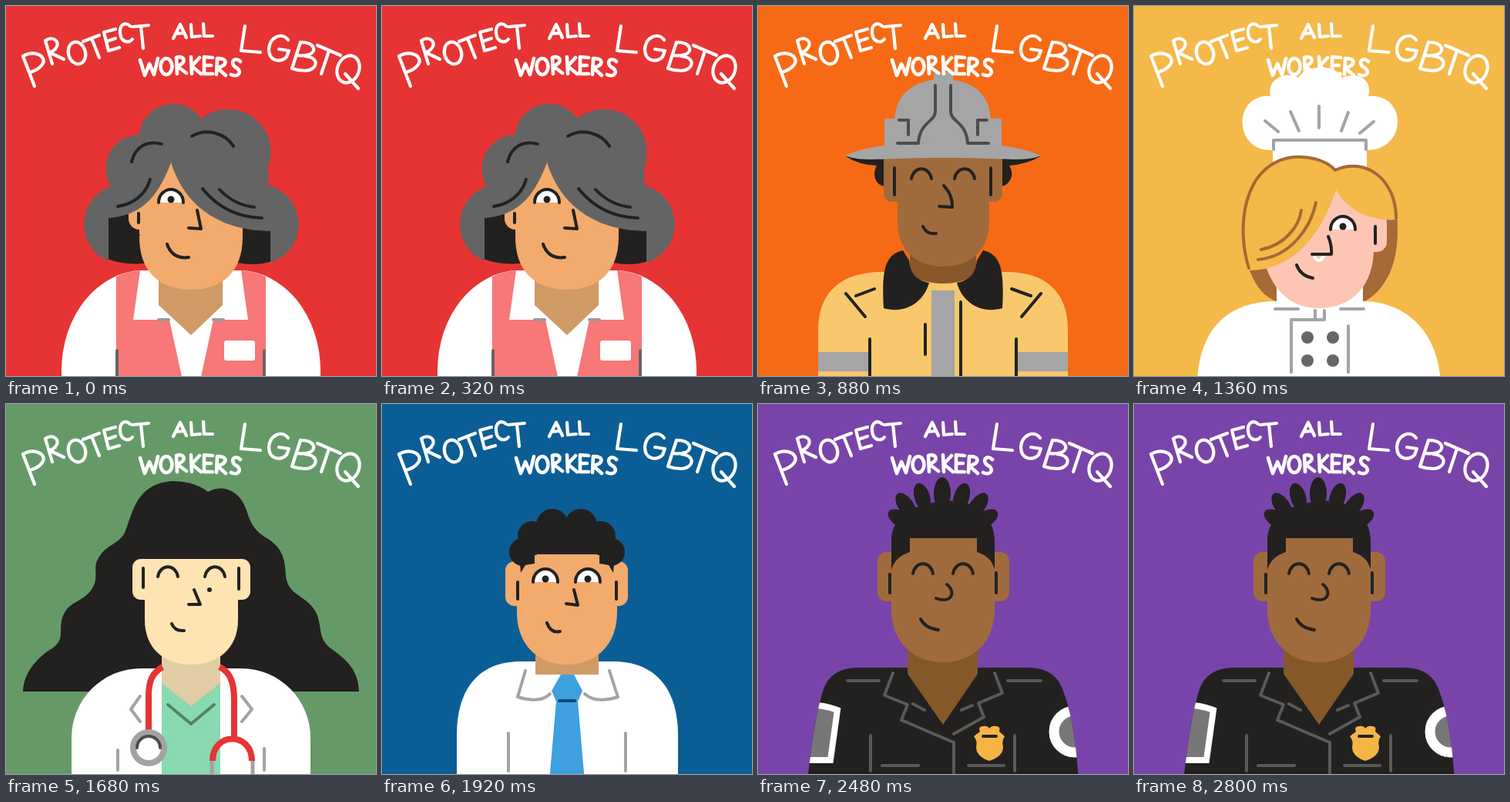
An HTML page that plays this animation: 480x480 px, repeating every 2880 ms.

```html
<!DOCTYPE html>
<html lang="en">
<head>
<meta charset="utf-8">
<title>Protect all LGBTQ workers</title>
<style>
html, body { margin: 0; width: 100%; height: 100%; overflow: hidden; background: #e63434; }
svg { display: block; width: 100vw; height: 100vh; }

.worker { visibility: hidden; animation: show 2880ms step-end infinite; animation-delay: calc(var(--i) * 480ms - 2880ms); }
@keyframes show {
  0% { visibility: visible; }
  16.66667%, 100% { visibility: hidden; }
}

/* hand-drawn edges, redrawn every 80 ms */
#art { animation: boil 240ms step-end infinite; }
@keyframes boil {
  0% { filter: url(#rough0); }
  33.33333% { filter: url(#rough1); }
  66.66667%, 100% { filter: url(#rough2); }
}

.l { fill: none; stroke: #222; stroke-width: 4; stroke-linecap: round; stroke-linejoin: round; }
.g { stroke: #a3a3a3; }
.d { stroke: #595959; }
.w { fill: #fff; }
.k { fill: #222120; }
.brown { fill: #a06b3c; }
.tan { fill: #f3aa6d; }
#text { fill: none; stroke: #fff; stroke-width: 4.2; stroke-linecap: round; stroke-linejoin: round; }
</style>
</head>
<body>
<svg viewBox="0 0 480 480" role="img" aria-label="Protect all LGBTQ workers">
<defs>
  <filter id="rough0" filterUnits="userSpaceOnUse" x="-20" y="-20" width="520" height="520" color-interpolation-filters="sRGB">
    <feTurbulence type="fractalNoise" baseFrequency=".25" seed="2"/>
    <feDisplacementMap in="SourceGraphic" scale="1.5" xChannelSelector="R" yChannelSelector="G"/>
  </filter>
  <filter id="rough1" filterUnits="userSpaceOnUse" x="-20" y="-20" width="520" height="520" color-interpolation-filters="sRGB">
    <feTurbulence type="fractalNoise" baseFrequency=".25" seed="5"/>
    <feDisplacementMap in="SourceGraphic" scale="1.5" xChannelSelector="R" yChannelSelector="G"/>
  </filter>
  <filter id="rough2" filterUnits="userSpaceOnUse" x="-20" y="-20" width="520" height="520" color-interpolation-filters="sRGB">
    <feTurbulence type="fractalNoise" baseFrequency=".25" seed="9"/>
    <feDisplacementMap in="SourceGraphic" scale="1.5" xChannelSelector="R" yChannelSelector="G"/>
  </filter>
  <g id="eye">
    <path class="w" d="M-16 0A16 17 0 0 1 16 0Z"/>
    <path class="l" d="M-16 0A16 17 0 0 1 16 0"/>
    <circle class="k" cy="-4" r="4.5"/>
  </g>
  <path id="wink" class="l" d="M-13 0C-10 -17 10 -17 13 0"/>
  <path id="uniform" d="M64 490C70 440 75 400 85 370Q95 342 130 342H350Q385 342 395 370C407 400 413 440 416 490Z"/>
  <clipPath id="sleeves"><use href="#uniform"/></clipPath>
</defs>

<g id="art">
  <!-- shop assistant -->
  <g class="worker" style="--i:0">
    <path fill="#e63434" d="M-20-20H500V500H-20Z"/>
    <path class="k" d="M132 240H180V334Q150 336 132 328ZM300 240H345V331Q325 338 300 333Z"/>
    <path class="w" d="M72 490V473A106 130 0 0 1 178 343H302A106 130 0 0 1 408 473V490Z"/>
    <path fill="#f87777" d="M143 351Q158 344 175 343H305Q322 344 337 351V490H143Z"/>
    <path class="w" d="M174 343H305L314 407H269L251 490H230L212 407H165Z"/>
    <path fill="#d09a66" d="M198 340H281V388L240 427L198 388Z"/>
    <rect class="tan" x="159" y="252" width="30" height="38" rx="14"/>
    <path class="tan" d="M173 200V300C173 345 200 368 240 368S307 345 307 300V200Z"/>
    <path fill="#646464" d="M133 331A52 52 0 0 1 136 234A44 44 0 0 1 173 167A44 44 0 0 1 253 146A56 56 0 0 1 340 210L341 233A52 52 0 0 1 343 333V292C290 292 235 270 214 203C195 255 170 272 133 275Z"/>
    <path class="l" d="M163 202C168 181 185 174 202 179M241 169C260 158 285 165 295 182M145 260C165 257 181 245 187 225M255 237C275 262 300 274 332 275M277 238C290 252 305 259 322 261M172 269V281"/>
    <use href="#eye" x="214" y="255"/>
    <path class="l" d="M248 265L253 289L237 288M209 309Q216 329 237 326"/>
    <path class="l" style="stroke:#999" d="M198 407H211M269 407H282"/>
    <path class="l" style="stroke:#666" d="M144 447V490M335 447V490"/>
    <rect class="w" x="283" y="434" width="40" height="26" rx="3"/>
  </g>

  <!-- firefighter -->
  <g class="worker" style="--i:1">
    <path fill="#f66a16" d="M-20-20H500V500H-20Z"/>
    <path class="k" d="M114 195H366Q350 205 326 207Q334 220 323 231Q316 236 308 233V200H172V233Q160 236 154 228Q148 218 154 207Q130 206 114 195Z"/>
    <path fill="#f9c86d" d="M78 490V420C78 370 110 345 160 345H322C372 345 402 370 402 420V490Z"/>
    <path fill="#a5a5a5" d="M225 369H255V490H225ZM78 449H145V474H78ZM335 449H402V474H335Z"/>
    <path fill="#895629" d="M197 310H283V350Q240 370 197 350Z"/>
    <path class="k" d="M188 317C166 322 160 340 163 392C190 400 215 385 222 359C208 356 198 350 196 330ZM292 317C314 322 320 340 317 392C290 400 265 385 258 359C272 356 282 350 284 330Z"/>
    <g class="brown">
      <rect x="163" y="190" width="30" height="64" rx="11"/>
      <rect x="287" y="190" width="30" height="64" rx="11"/>
      <path d="M181 190V280C181 318 206 338 240 338S300 318 300 280V190Z"/>
    </g>
    <g fill="#a5a5a5">
      <rect x="228" y="86" width="25" height="30" rx="4"/>
      <path d="M177 150C178 112 205 95 240 95S302 112 302 150V186H177Z"/>
      <rect x="164" y="146" width="24" height="40" rx="2"/>
      <rect x="292" y="146" width="24" height="40" rx="2"/>
      <path d="M113 194C145 180 185 178 240 178S335 180 367 194C345 203 320 197 240 197S135 203 113 194Z"/>
    </g>
    <path class="l" style="stroke:#4c4c4c" d="M230 103V137C230 150 210 150 208 178H181M250 103V137C250 150 270 150 272 178H299M183 148H195V167M297 148H285V167"/>
    <path class="l" d="M177 210V245M302 210V245M241 233Q253 246 252 261L235 260M214 286Q219 297 231 295"/>
    <use href="#wink" x="212" y="224"/>
    <use href="#wink" x="268" y="224"/>
    <path class="l" d="M114 373L139 403M127 376L151 367M367 373L342 403M354 376L329 367M217 413V452M263 384V490M145 432V490M335 432V490"/>
  </g>

  <!-- chef -->
  <g class="worker" style="--i:2">
    <path fill="#f5b949" d="M-20-20H500V500H-20Z"/>
    <path class="w" d="M180 215V187C128 190 128 113 177 117C172 92 200 85 213 93C225 75 262 75 270 93C290 85 310 95 304 117C355 113 355 187 302 187V220Z"/>
    <path class="l g" d="M170 149L187 163M203 137L214 162M240 130V158M278 138L269 162M311 150L293 165M181 186V174H301V186"/>
    <path fill="#a56a35" d="M150 343Q162 376 187 384V335ZM300 270H341C346 325 332 367 296 385Z"/>
    <path class="w" d="M82 490C85 410 130 383 185 383V350H297V383C350 383 395 420 398 490Z"/>
    <g fill="#fdc6b4">
      <rect x="296" y="268" width="32" height="51" rx="13"/>
      <path d="M170 335C183 375 208 392 240 392C285 392 311 360 311 315V225H230Z"/>
    </g>
    <path fill="#f5b949" d="M150 343C133 290 140 210 200 197C225 193 250 200 261 213C300 195 340 225 340 277C310 280 276 266 262 238C245 292 210 342 150 343Z"/>
    <path class="l" style="stroke:#a56a35" d="M149 340C133 290 140 210 200 197C225 193 250 200 261 213C300 195 340 225 340 275M165 316C195 310 214 287 217 265M161 329C205 325 230 285 236 255"/>
    <use href="#eye" x="271" y="290"/>
    <path class="l" style="stroke:#fff" d="M234 325Q239 335 246 325"/>
    <path class="l" d="M252 299Q257 311 256 322H231M211 336Q216 350 232 353M313 286V308"/>
    <path class="l g" d="M183 393H213M268 393H298M204 475V407H247V395M235 395V406M278 415V475"/>
    <g fill="#666">
      <circle cx="225" cy="430" r="8"/><circle cx="258" cy="430" r="8"/>
      <circle cx="225" cy="460" r="8"/><circle cx="258" cy="460" r="8"/>
    </g>
  </g>

  <!-- doctor -->
  <g class="worker" style="--i:3">
    <path fill="#659a68" d="M-20-20H500V500H-20Z"/>
    <path class="k" d="M22 373C23 345 45 326 60 317C80 303 64 290 77 269C86 255 105 254 113 237C121 222 111 213 121 198C131 182 146 182 154 167C164 146 166 104 215 100C240 100 255 108 262 114C282 103 304 113 312 138C318 157 324 166 340 175C358 187 362 200 363 222C365 250 391 247 403 272C411 293 404 305 424 319C442 332 457 345 458 373Z"/>
    <path class="w" d="M85 490V433A90 90 0 0 1 175 343H305A90 90 0 0 1 395 433V490Z"/>
    <path fill="#89d9b1" d="M202 350H278V490H202Z"/>
    <path fill="#e1cca3" d="M202 310H278V362L240 392L202 362Z"/>
    <g fill="#fee3b3">
      <rect x="164" y="201" width="153" height="53" rx="11"/>
      <path d="M180 230V280C180 318 206 338 240 338S301 318 301 280V230Z"/>
    </g>
    <path class="l" d="M178 213V238M302 213V240M244 241L252 260H237M215 285Q219 295 231 294"/>
    <use href="#wink" x="210" y="224"/>
    <use href="#wink" x="271" y="224"/>
    <circle class="k" cx="264" cy="241" r="3"/>
    <path class="l" style="stroke:#548658" d="M210 390L240 415L270 390"/>
    <path class="l g" d="M174 379L162 396L174 412M306 379L319 396L306 412M145 449V475M335 447V475"/>
    <path class="l g" style="stroke-width:5" d="M267 460V490M320 460V490"/>
    <path class="l" style="stroke:#e63434;stroke-width:8;stroke-linecap:butt" d="M203 341C190 349 185 358 185 380V425M277 341C293 349 296 365 296 385V433M268 463C268 425 319 425 319 463"/>
    <circle class="w" cx="185" cy="446" r="20" stroke="#a3a3a3" stroke-width="8"/>
    <path class="l" style="stroke:#4c4c4c" d="M170 446A15 15 0 0 1 200 446"/>
  </g>

  <!-- office worker -->
  <g class="worker" style="--i:4">
    <path fill="#0b5e95" d="M-20-20H500V500H-20Z"/>
    <path class="w" d="M97 490V430C97 370 125 334 180 334H300C355 334 384 370 384 430V490Z"/>
    <path fill="#d09a66" d="M199 310H281V351H199Z"/>
    <g class="tan">
      <rect x="160" y="204" width="30" height="58" rx="12"/>
      <rect x="289" y="204" width="30" height="58" rx="12"/>
      <path d="M175 190V270C175 314 204 338 240 338S305 314 305 270V190Z"/>
    </g>
    <g class="k">
      <circle cx="183" cy="192" r="18"/><circle cx="195" cy="171" r="19"/>
      <circle cx="221" cy="157" r="21"/><circle cx="258" cy="157" r="21"/>
      <circle cx="284" cy="171" r="19"/><circle cx="297" cy="192" r="18"/>
      <path d="M185 160H295V195H185Z"/>
    </g>
    <path class="tan" d="M198 196H282V218H198ZM186 208H200V225H180V219ZM294 208H280V225H300V219Z"/>
    <path class="k" d="M178 195H198V207L186 209L180 219ZM302 195H282V207L294 209L300 219Z"/>
    <use href="#eye" x="212" y="231"/>
    <use href="#eye" x="267" y="231"/>
    <path class="l" d="M176 231V253M304 231V253M249 241L254 261L239 259M214 284Q219 298 231 295"/>
    <path fill="#3ea0df" d="M232 351H249L260 372L254 386L263 490H217L226 386L220 372Z"/>
    <path class="l" style="stroke:#0b4775" d="M230 385H250"/>
    <path class="l g" d="M186 346L176 380Q205 389 218 376M295 346L306 380Q277 389 263 376M164 427V476M316 427V476"/>
  </g>

  <!-- officer -->
  <g class="worker" style="--i:5">
    <path fill="#7944a9" d="M-20-20H500V500H-20Z"/>
    <use class="k" href="#uniform"/>
    <g clip-path="url(#sleeves)">
      <path fill="#777" stroke="#fff" stroke-width="8" d="M60 390Q85 390 103 397L94 462H50Z"/>
      <circle cx="411" cy="425" r="27" fill="#777" stroke="#fff" stroke-width="13"/>
    </g>
    <path fill="#85582a" d="M194 310H285V350L240 416L194 350Z"/>
    <g class="brown">
      <rect x="155" y="192" width="32" height="64" rx="12"/>
      <rect x="294" y="192" width="32" height="64" rx="12"/>
      <path d="M174 210L190 170H290L306 210L307 265C307 310 278 335 240 335S173 310 173 265Z"/>
    </g>
    <g class="k">
      <path d="M173 215V175C175 145 200 130 240 126S305 145 307 175V215Q303 198 284 192V174H197V192Q178 198 173 215Z"/>
      <ellipse cx="239" cy="116" rx="11" ry="21"/>
      <ellipse cx="213" cy="121" rx="10" ry="19" transform="rotate(-17 213 121)"/>
      <ellipse cx="264" cy="121" rx="10" ry="19" transform="rotate(17 264 121)"/>
      <ellipse cx="192" cy="132" rx="10" ry="19" transform="rotate(-35 192 132)"/>
      <ellipse cx="285" cy="132" rx="10" ry="19" transform="rotate(35 285 132)"/>
      <ellipse cx="185" cy="149" rx="10" ry="18" transform="rotate(-60 185 149)"/>
      <ellipse cx="295" cy="149" rx="10" ry="18" transform="rotate(60 295 149)"/>
    </g>
    <use href="#wink" x="214" y="220"/>
    <use href="#wink" x="266" y="220"/>
    <path class="l" d="M171 221V245M309 219V245M245 234C257 243 252 260 231 252M211 279Q217 291 234 293"/>
    <path class="l d" d="M116 359H157M324 359H367M175 349L164 378L194 390L186 410L254 439V490M307 349L317 375L286 388L293 406L254 428M201 389L216 397M264 397L278 391M146 430V476M161 469H208M273 469H319M333 430V476"/>
    <path fill="#f4b545" d="M288 425Q285 418 292 418Q298 417 300 421Q303 417 309 418Q315 418 313 425L320 431Q316 437 318 445Q318 457 300 463Q283 457 283 445Q285 437 280 431Z"/>
    <path class="l" d="M292 431H309"/>
  </g>

  <g id="text">
    <path d="M22 65L37 104M22 65C38 56 54 66 47 76Q42 83 31 86M51 45L60 75M51 45C60 38 71 46 65 54Q62 59 56 60L75 69"/>
    <ellipse cx="92" cy="61" rx="11" ry="14.5" transform="rotate(-15 92 61)"/>
    <path d="M100 46L121 38M111 42L121 67M142 30L127 34L133 58L147 54M130 46L142 42M161 26C155 20 147 24 148 35C149 47 159 49 164 43M164 27L185 25M175 26L178 55"/>
    <path d="M217 42L226 24L234 41M220 36L231 35M240 24L241 40L252 39M256 23L257 39L268 39"/>
    <path d="M310 26L305 58L330 60M366 44C357 33 342 41 341 56C341 72 356 74 364 66L367 58L354 56M382 47L371 81M382 47C402 47 403 60 393 63Q387 65 377 64M388 65C409 67 403 84 388 84Q379 84 371 81M404 51L434 64M419 58L409 88M440 88L457 107"/>
    <ellipse cx="444" cy="82" rx="14" ry="18" transform="rotate(22 444 82)"/>
    <g stroke-width="4.6">
      <path d="M174 70L180 90L186 75L192 89L197 68M221 67L222 88M221 67C231 63 236 74 222 78L234 87M240 66L241 88M251 67L241 78L253 88M268 67L257 66V88L268 88M257 77H266M274 68L273 89M274 68C287 67 289 77 274 80L285 90M304 72C297 65 290 73 297 79C307 83 303 94 292 89"/>
      <ellipse cx="208" cy="78.5" rx="7.5" ry="10.5"/>
    </g>
  </g>
</g>
</svg>
</body>
</html>
```
